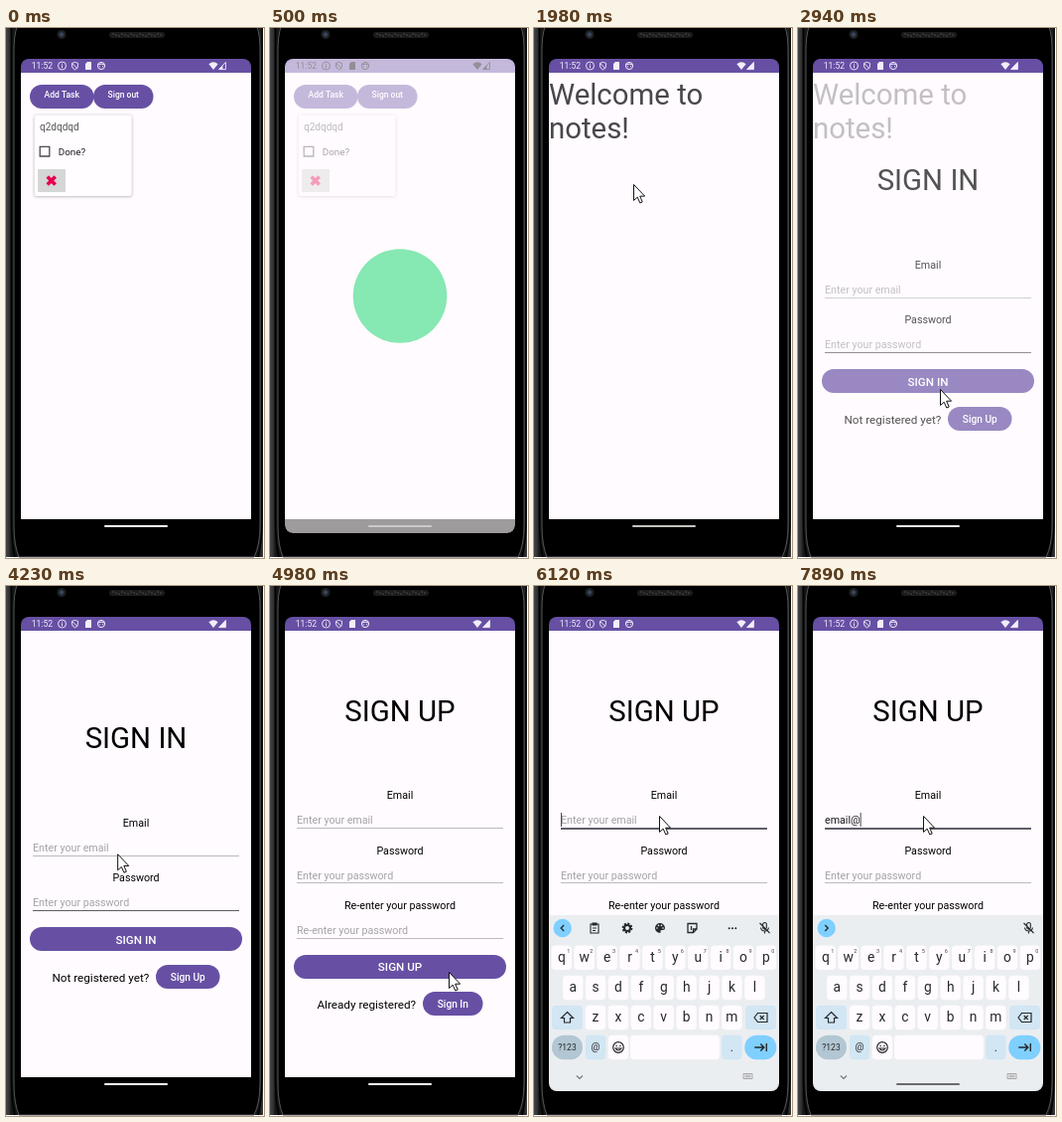
Write an HTML page with a canvas that moves like this. It is 260 px wide and 533 px high and loops after 8 s.

```html
<!DOCTYPE html>
<html lang="en">
<head>
<meta charset="utf-8">
<title>Notes app</title>
<style>
html, body { margin: 0; width: 100%; height: 100%; overflow: hidden; background: #fff; }
canvas { display: block; width: 260px; height: 533px; }
</style>
</head>
<body>
<canvas></canvas>
<script>
const W = 260, H = 533, LOOP = 8000;
const PURPLE = '#6750a4', PAPER = '#fffbfe', KEYS = '#ebeef1', INK = '#26282b', BLUE = '#7fcfff', PALE = '#d2e6f4';
const dpr = window.devicePixelRatio || 1;
const stage = setup(document.querySelector('canvas'));
const buffer = setup(document.createElement('canvas'));
let c = stage;

function setup(canvas) {
  canvas.width = W * dpr;
  canvas.height = H * dpr;
  const ctx = canvas.getContext('2d');
  ctx.scale(dpr, dpr);
  return ctx;
}

const ramp = (t, a, b) => Math.min(1, Math.max(0, (t - a) / (b - a)));
const easeOut = v => 1 - (1 - v) ** 3;

function box(x, y, w, h, r, fill) {
  c.beginPath();
  c.roundRect(x, y, w, h, r);
  c.fillStyle = fill;
  c.fill();
}
function disc(x, y, r, fill) {
  c.beginPath();
  c.arc(x, y, r, 0, 7);
  c.fillStyle = fill;
  c.fill();
}
// Small icon from path data, placed at x, y
function icon(d, x, y, color, width = 1, fill) {
  c.save();
  c.translate(x, y);
  const p = new Path2D(d);
  if (fill) { c.fillStyle = fill; c.fill(p); }
  if (width) { c.strokeStyle = color; c.lineWidth = width; c.stroke(p); }
  c.restore();
}
function text(s, x, y, size, color = '#000', align = 'left', weight = 400) {
  c.font = `${weight} ${size}px Roboto, sans-serif`;
  c.textAlign = align;
  c.fillStyle = color;
  c.fillText(s, x, y);
}
function textWidth(s, size) {
  c.font = `400 ${size}px Roboto, sans-serif`;
  return c.measureText(s).width;
}
function button(label, x, y, w, size, base) {
  box(x, y, w, 24, 12, PURPLE);
  text(label, x + w / 2, base, size, '#fff', 'center', 500);
}
const pill = color => box(99, 500, 64, 2, 1, color);

// Crossfade of two whole screens
function fade(from, to, k, t) {
  if (k < 1) from(t);
  if (k <= 0) return;
  if (k >= 1) return to(t);
  c = buffer;
  c.clearRect(0, 0, W, H);
  to(t);
  c = stage;
  c.globalAlpha = k;
  c.drawImage(buffer.canvas, 0, 0, W, H);
  c.globalAlpha = 1;
}

function phone() {
  c.fillStyle = '#fff';
  c.fillRect(0, 0, W, H);
  const g = c.createLinearGradient(0, 0, W, 0);
  [[0, '#444'], [.012, '#333'], [.02, '#161616'], [.98, '#161616'], [1, '#444']].forEach(s => g.addColorStop(...s));
  c.fillStyle = g;
  c.fillRect(0, 0, 259, 532);
  icon('M11 -1Q8 8 8 22V500Q8 520 13 532H250Q256 520 256 500V22Q256 8 253 -1Z', 0, 0, '#555', 1, '#000');
  icon('M5.5 0V495Q5.5 518 9 532M258 0V495Q258 518 254 532', 0, 0, '#000', 1.5);
  disc(56, 6.5, 4.5, '#1d2025');
  disc(56, 6.5, 2.2, '#39455c');
  box(104, 4, 56, 6, 3, '#1c1c1c');
  c.fillStyle = '#333';
  for (let i = 0; i < 17; i++) c.fillRect(107 + i * 3, 5 + i * 7 % 3, 2, 2);
}

function status(color, full) {
  text('11:52', 25.8, 41, 8.5, color);
  icon('M4 0A4 4 0 1 1 -4 0A4 4 0 1 1 4 0M0 -.6V2.3M0 -2.3V-1.3', 56.5, 38, color, .9);
  icon('M0 -3.7L3 -2.6V0Q3 2.7 0 3.9Q-3 2.7 -3 0V-2.6ZM-2.7 -2.3L2.6 2.8', 69.5, 38, color, .9);
  icon('M-1 -4H3V4H-3V-2Z', 83, 38, color, 0, color);
  icon('M3.6 0A3.6 3.6 0 1 1 -3.6 0A3.6 3.6 0 1 1 3.6 0M-3.4 -1Q0 -3 3.4 -1M-1.5 .3V1.2M1.5 .3V1.2', 96, 38, color, 1);
  icon('M0 4L-4.6 -1.7Q0 -5.6 4.6 -1.7Z', 209, 38, color, 0, color);
  icon('M-3.4 3.6H3.4V-3.6Z', 218, 38, color, .9, full ? color : undefined);
  if (!full) icon('M-3.4 3.6H.4V-.4Z', 218, 38, color, 0, color);
}

// Page body with purple status bar and black navigation bar
function page(t, pillColor = '#fff') {
  box(15, 31, 232, 477, 0, '#000');
  box(15, 31, 232, 15, 0, PURPLE);
  box(15, 45, 232, 449, 0, PAPER);
  status('#f2eefa', t > 1740);
  pill(pillColor);
}

function tasks(t) {
  page(t);
  button('Add Task', 24, 57, 64.5, 8.5, 69.8);
  button('Sign out', 88, 57, 60.5, 8.5, 69.8);
  c.save();
  c.shadowColor = '#0005';
  c.shadowBlur = 3 * dpr;
  c.shadowOffsetY = .6 * dpr;
  box(28.7, 87.5, 98, 81.5, 2, '#fffdff');
  c.restore();
  text('q2dqdqd', 34, 102.7, 10, '#555');
  icon('M0 0H9.6V9.6H0Z', 34.2, 119.4, '#4b4850', 1.3);
  text('Done?', 52.8, 128, 9.8, '#1c1b1f');
  box(32, 142, 28, 23, 0, '#d5d6d6');
  icon('M-4 -4L4 4M4 -4L-4 4', 45.7, 153.5, '#e5004f', 3.6);
}

function splash(t) {
  box(15, 31, 232, 477, 8, PAPER);
  status('#56545a', t > 1740);
  disc(131, 269.5, 47.3, '#3ddc84');
  pill('#aaa8ac');
}

function welcome(t) {
  page(t, '#c4c2bc');
  text('Welcome to', 15, 77, 29.4, '#49474c');
  text('notes!', 15, 111.3, 29.4, '#49474c');
}

const SIZE = 10.7;
const LIGHT = ['#bdbabf', 1], DARK = ['#5e5b61', 1], FOCUS = ['#625d6c', 2];
function field(label, hint, base, line, value = '') {
  text(label, 131, base, SIZE, '#000', 'center');
  text(value || hint, 27, base + 25, SIZE, value ? '#1c1b1f' : '#a6a3a8');
  const [color, h] = line;
  box(27, Math.floor(base + 29), 208, h, 0, color);
}

function signIn(t) {
  page(t);
  text('SIGN IN', 131, 163.3, 29.4, '#000', 'center');
  field('Email', 'Enter your email', 242, LIGHT);
  field('Password', 'Enter your password', 297, DARK);
  button('SIGN IN', 24, 343, 214, 11.6, 359.7);
  text('Not registered yet?', 46.5, 397.6, 11.7);
  button('Sign Up', 151, 381, 64.5, 10.1, 396.7);
}

// When each character of the address is typed
const TYPED = [7080, 7200, 7350, 7500, 7680, 7890];
const valueAt = t => 'email@'.slice(0, TYPED.filter(k => t >= k).length);

function signUp(t) {
  const value = valueAt(t);
  page(t);
  text('SIGN UP', 131, 136, 29.4, '#000', 'center');
  field('Email', 'Enter your email', 214.3, t >= 5940 ? FOCUS : t >= 5640 ? DARK : LIGHT, value);
  field('Password', 'Enter your password', 269.8, LIGHT);
  field('Re-enter your password', 'Re-enter your password', 325, LIGHT);
  button('SIGN UP', 24, 371, 214, 11.6, 387.4);
  text('Already registered?', 47.5, 425.2, 11.7);
  button('Sign In', 154, 408, 60.5, 10.1, 424.2);
  const end = 27 + textWidth(value, SIZE);
  if (value && value.length < 6) box(27, 241, end - 27, .7, 0, '#333');
  if (t >= 5940 && !(t >= 6300 && t < 6780)) box(end, 228, 1, 14, 0, '#4a4654');
}

function key(label, x, y, w = 20.4, fill = PAPER, size = 13.8, r = 4) {
  box(x - w / 2, y, w, 24.5, r, fill);
  text(label, x, y + 12.2 + size * .32, size, INK, 'center');
}

function toolbar(t) {
  const open = t < 7140, value = valueAt(t);
  disc(28.7, 344, 9.2, BLUE);
  icon(open ? 'M1.5 -3L-1.5 0L1.5 3' : 'M-1.5 -3L1.5 0L-1.5 3', 28.7, 344, INK, 1.3);
  if (open) {
    icon('M-4 -4H4V5H-4ZM-2 -5H2V-3H-2ZM-2 0H2M-2 2.5H1', 61, 344, INK, 1.1);
    c.setLineDash([2, 1.4]);
    icon('M4.4 0A4.4 4.4 0 1 1 -4.4 0A4.4 4.4 0 1 1 4.4 0', 94, 344, INK, 2);
    c.setLineDash([]);
    icon('M3 0A3 3 0 1 1 -3 0A3 3 0 1 1 3 0', 94, 344, INK, 2);
    icon('M0 5A5 5 0 1 1 5 0Q5 2 3 2H1.5Q0 2.5 .5 4Q.7 5 0 5', 127, 344, INK, 0, INK);
    [[-3, 0], [-1.5, -2.6], [1.5, -2.6], [3, 0]].forEach(([x, y]) => disc(127 + x, 344 + y, .8, KEYS));
    icon('M-4.5 -4.5H4.5V1L1 4.5H-4.5ZM4 1H1V4M-1 -2V2', 159.5, 344, INK, 1.3);
    [-3.3, 0, 3.3].forEach(d => disc(200 + d, 344.3, 1, INK));
  } else if (value.length < 6) {
    text(value, 130, 348, 10.5, INK, 'center');
  }
  icon('M-1.8 -4.5Q0 -6.5 1.8 -4.5V0Q0 2.5 -1.8 0ZM-4 -.5Q-3.5 3 0 3Q3.5 3 4 -.5M0 3V5.5M-5 -5L5 5', 232.5, 344, INK, 1.1);
}

function keyboard(t) {
  c.save();
  c.translate(0, 177 * (1 - easeOut(ramp(t, 5900, 6110))));
  box(15, 331, 232, 177, 0, KEYS);
  toolbar(t);
  [...'qwertyuiop'].forEach((k, i) => {
    const x = 27.8 + i * 22.9;
    key(k, x, 361.5);
    text((i + 1) % 10, x + 7, 368.5, 5.5, '#444', 'center');
  });
  [...'asdfghjkl'].forEach((k, i) => key(k, 39.2 + i * 22.9, 391.7));
  key('', 33.5, 421.7, 31, PALE);
  icon('M0 -5.5L6 .5H3V5H-3V.5H-6Z', 33.5, 434, INK, 1.2);
  [...'zxcvbnm'].forEach((k, i) => key(k, 62 + i * 22.9, 421.7));
  key('', 228.5, 421.7, 31, PALE);
  icon('M-6.5 0L-3 -4.5H6.5V4.5H-3ZM-.8 -2L3.2 2M3.2 -2L-.8 2', 228.5, 434, INK, 1.2);
  key('?123', 33.5, 451.8, 31, '#b2c7d3', 8.5, 12);
  key('@', 62, 451.8, 20.4, PALE, 10);
  key('', 85, 451.8);
  icon('M5.3 0A5.3 5.3 0 1 1 -5.3 0A5.3 5.3 0 1 1 5.3 0M-3 1Q0 5 3 1ZM-1.9 -2.3V-.8M1.9 -2.3V-.8', 85, 464, INK, 1.2);
  key('', 142, 451.8, 90);
  key('.', 199.3, 451.8, 20.4, PALE, 12);
  key('', 228.3, 451.8, 32, BLUE, 12, 12);
  icon('M-6 0H3M0 -3.5L3.5 0L0 3.5M6 -4V4', 228.3, 464, INK, 1.4);
  icon('M-3 -1.5L0 1.5L3 -1.5', 46, 494, '#777', 1.2);
  icon('M-4.5 -2.5H4.5V2.5H-4.5ZM-3 -.8H3M-3 .8H3', 215.5, 493, '#999', .8);
  c.globalAlpha = ramp(t, 6270, 6510);
  pill('#6a6a6c');
  c.restore();
}

// Pointer path: time, x, y
const PATH = [
  [1740, 90, 126], [1980, 100, 157], [2100, 105, 149], [2250, 105, 149], [2700, 143, 363],
  [3180, 143, 363], [3510, 109, 264], [4200, 109, 264], [4230, 112, 269], [4680, 180, 388],
  [5130, 180, 388], [5490, 136, 184], [5700, 127, 232], [5880, 126, 231]
];
function pointer(t) {
  const n = PATH.findIndex(p => p[0] > t);
  const b = PATH.at(n), a = n > 0 ? PATH[n - 1] : b;
  const k = a === b ? 0 : ramp(t, a[0], b[0]);
  const x = a[1] + (b[1] - a[1]) * k, y = a[2] + (b[2] - a[2]) * k;
  if ((t >= 4680 && t < 4830) || (t >= 5670 && t < 5850)) {
    c.beginPath();
    c.arc(x, y, 10.3, 0, 7);
    c.strokeStyle = '#222';
    c.lineWidth = 1.1;
    c.stroke();
  }
  icon('M.5 .5V16.5L4.2 13.2L6.8 19L9.2 18L6.7 12.2H11.6Z', x, y, '#111', 1, '#fff');
}

function screen(t) {
  c.save();
  c.beginPath();
  c.roundRect(15, 31, 232, 477, 8);
  c.clip();
  if (t < 1260) fade(tasks, splash, ramp(t, 340, 600), t);
  else if (t < 2820) fade(splash, welcome, ramp(t, 1200, 1590), t);
  else if (t < 4800) fade(welcome, signIn, ramp(t, 2820, 3000), t);
  else fade(signIn, signUp, ramp(t, 4800, 4980), t);
  if (t >= 5940) keyboard(t);
  c.restore();
}

const start = performance.now();
function draw() {
  const t = (performance.now() - start) % LOOP;
  phone();
  screen(t);
  if (t >= 600) pointer(t);
  requestAnimationFrame(draw);
}
draw();
</script>
</body>
</html>
```
